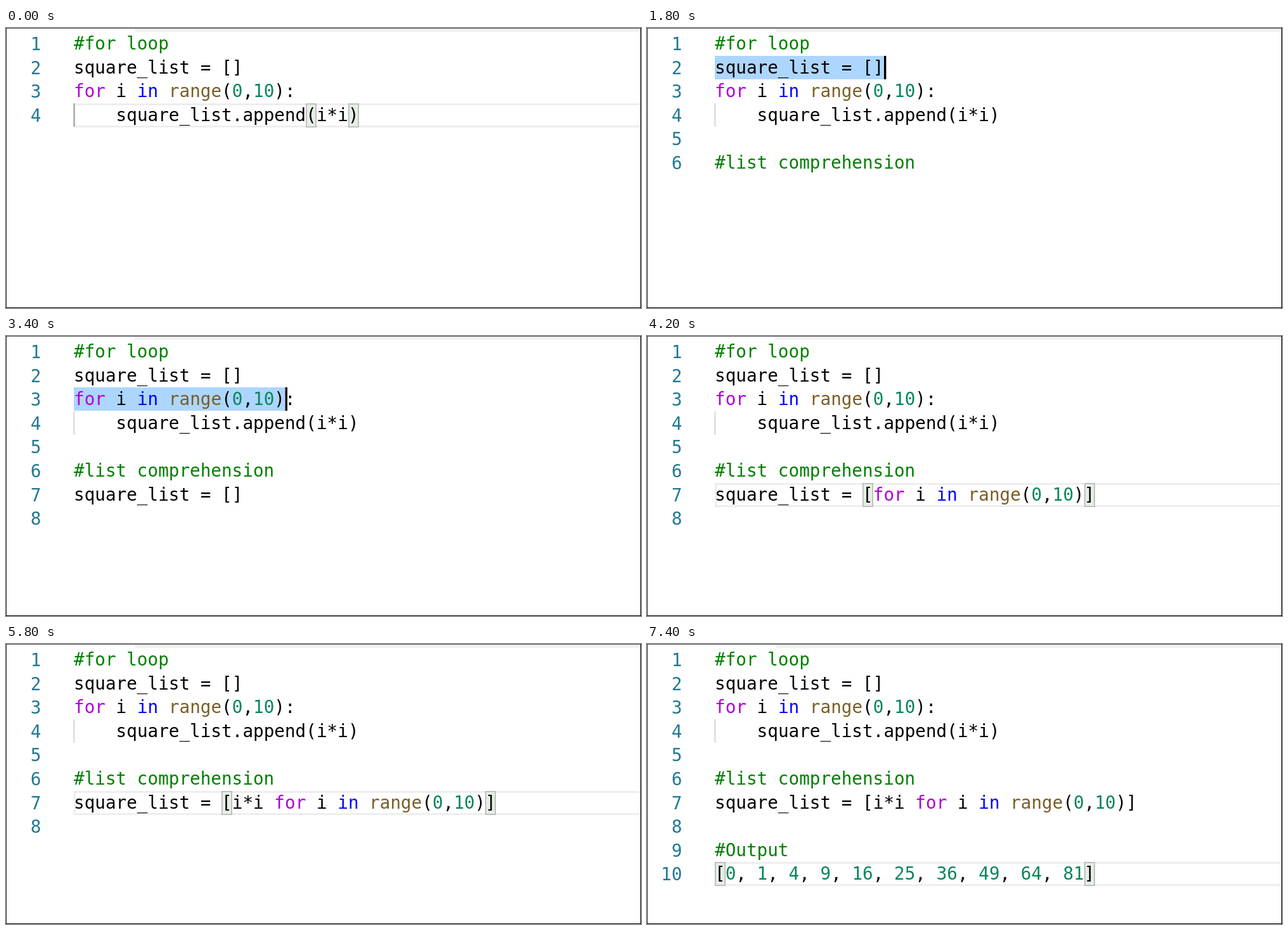
These frames come from a looping animation (1002 by 442 pixels, 8.2 s). An HTML page with a canvas:

```html
<!DOCTYPE html>
<html lang="en">
<head>
<meta charset="utf-8">
<title>List comprehension</title>
<style>
  html, body { margin: 0; width: 100%; height: 100%; overflow: hidden; background: #fff; }
  canvas { display: block; width: 1002px; height: 442px; }
</style>
</head>
<body>
<canvas id="stage" width="1002" height="442"></canvas>
<script>
const ctx = document.getElementById('stage').getContext('2d');
const W = 1002, H = 442, LOOP = 8200;
const LEFT = 107, CELL = 16.65, TOP = 6, ROW = 37.6;

const COLORS = {
  comment: '#008000', keyword: '#af00db', operator: '#0000ff',
  call: '#795e26', number: '#098658', plain: '#000000'
};
const TOKENS = /(?<comment>#.*)|(?<keyword>\bfor\b)|(?<operator>\bin\b)|(?<call>\brange\b)|(?<number>\d+)|(?<plain>[a-z_]+|[^\sa-z_\d#]+)/g;

const loopCode = ['#for loop', 'square_list = []', 'for i in range(0,10):', '    square_list.append(i*i)'];
const heading = [...loopCode, '', '#list comprehension'];
const empty = [...heading, 'square_list = []', ''];
const pasted = [...heading, 'square_list = [for i in range(0,10)]', ''];
const finished = [...heading, 'square_list = [i*i for i in range(0,10)]', ''];
const squares = Array.from({ length: 10 }, (_, i) => i * i);
const output = [...finished, '#Output', `[${squares.join(', ')}]`];

// Rows count from zero; brackets and select hold columns.
const steps = [
  { at: 0, lines: loopCode, row: 3, current: true, brackets: [22, 26] },
  { at: 1000, lines: heading, row: 5, current: true },
  { at: 1800, lines: heading, row: 1, select: [0, 16] },
  { at: 2600, lines: empty, row: 7, current: true },
  { at: 3400, lines: empty, row: 2, select: [0, 20] },
  { at: 4200, lines: pasted, row: 6, current: true, brackets: [14, 35] },
  { at: 5000, lines: pasted, row: 3, select: [23, 26] },
  { at: 5800, lines: finished, row: 6, current: true, brackets: [14, 39] },
  { at: 6600, lines: [...finished, '#Output', ''], row: 8, current: true },
  { at: 7400, lines: output, row: 9, current: true, brackets: [0, 35] }
];

const colX = col => LEFT + col * CELL;
const rowY = row => TOP + row * ROW;

function rect(x, y, w, h, color) {
  ctx.fillStyle = color;
  ctx.fillRect(x, y, w, h);
}

function text(str, x, baseline, color) {
  ctx.save();
  ctx.translate(x, baseline);
  ctx.scale(1, 1.04); // slightly tall editor face
  ctx.fillStyle = color;
  ctx.fillText(str, 0, 0);
  ctx.restore();
}

function drawCurrentLine(row) {
  const y = Math.round(rowY(row));
  rect(LEFT, y, W - LEFT, 3, '#eeeeee');
  rect(LEFT, y + 35, W - LEFT, 3, '#eeeeee');
  rect(LEFT, y, 3, 38, '#eeeeee');
}

function drawBracket(row, col) {
  const x = Math.round(colX(col)), y = Math.round(rowY(row));
  rect(x, y, 17, 38, '#b9b9b9');
  rect(x + 1.7, y + 1.7, 13.6, 34.6, '#e5efe5');
}

function drawCode(line, row) {
  for (const match of line.matchAll(TOKENS)) {
    const kind = Object.keys(COLORS).find(name => match.groups[name] !== undefined);
    text(match[0], colX(match.index), rowY(row) + 27.9, COLORS[kind]);
  }
}

function drawFrame() {
  rect(203, 1, W - 203, 5, '#f0f0f0');
  rect(0, 0, W, 1, '#555555');
  rect(0, 0, 1, H, '#333333');
  rect(W - 1, 0, 1, H, '#000000');
  rect(0, H - 1, W, 1, '#000000');
}

function draw(step) {
  const { lines, row, current, brackets = [], select } = step;
  rect(0, 0, W, H, '#ffffff');
  ctx.font = '27.65px "DejaVu Sans Mono", monospace';
  ctx.textBaseline = 'alphabetic';

  if (current) drawCurrentLine(row);
  if (select) {
    const [from, to] = select;
    rect(colX(from), Math.round(rowY(row)), (to - from) * CELL, 37, '#add6ff');
  }
  rect(LEFT - 0.5, Math.round(rowY(3)), 1.8, 37, row === 3 ? '#939393' : '#d3d3d3');
  brackets.forEach(col => drawBracket(row, col));

  lines.forEach((line, i) => {
    const label = String(i + 1);
    text(label, 55.3 - label.length * CELL, rowY(i) + 29, '#237893');
    drawCode(line, i);
  });
  if (select) rect(colX(select[1]) + 0.5, Math.round(rowY(row)), 3.5, 37, '#000000');
  drawFrame();
}

function tick() {
  const time = performance.now() % LOOP;
  draw(steps.findLast(step => step.at <= time));
  requestAnimationFrame(tick);
}
tick();
</script>
</body>
</html>
```
